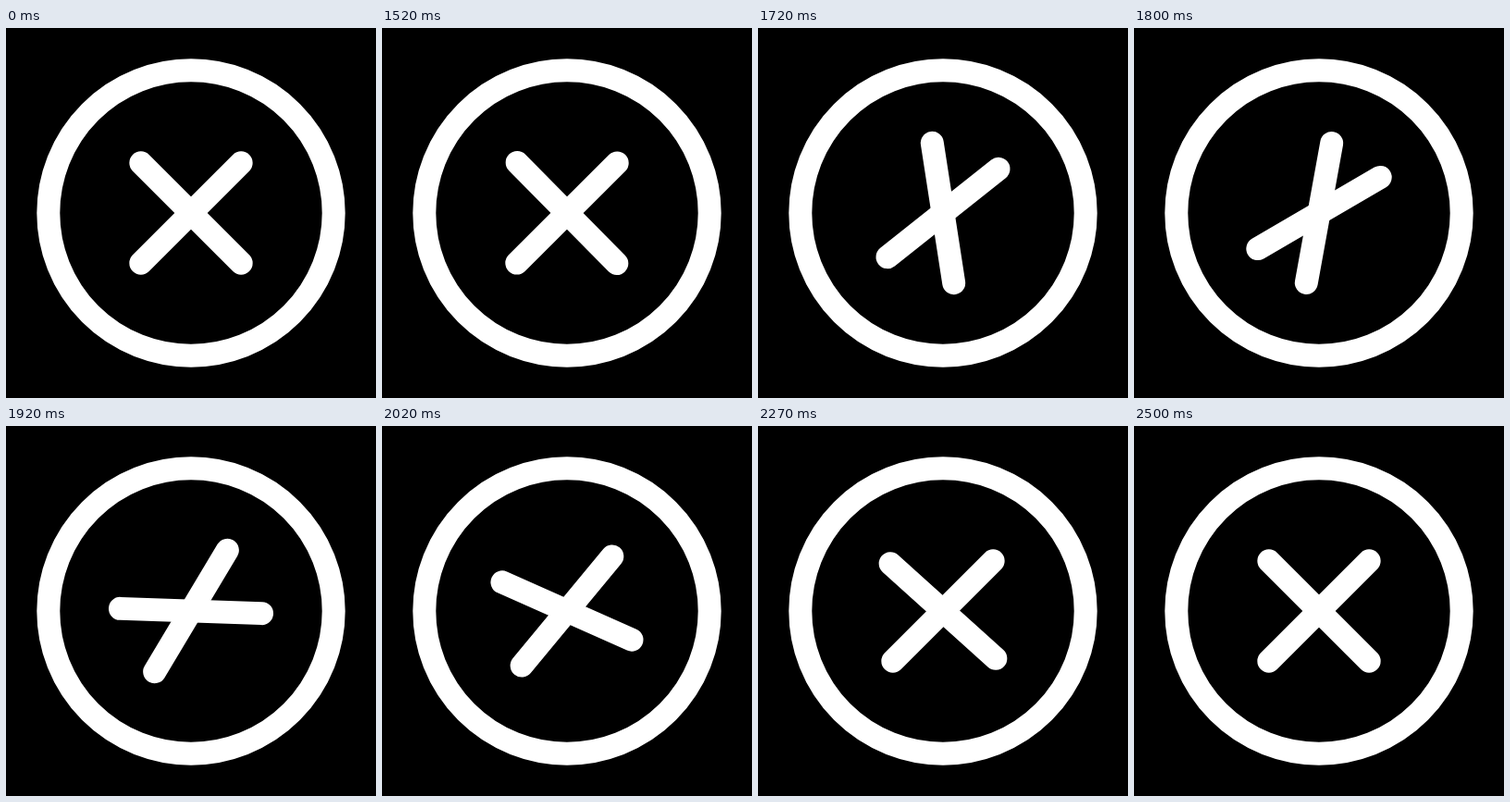
An HTML page for the animation above (2.52 s loop, 400 by 400 pixels).

```html
<!DOCTYPE html>
<html lang="en">
<head>
<meta charset="utf-8">
<title>Turning cross</title>
<style>
  html, body { margin: 0; width: 100%; height: 100%; overflow: hidden; background: #000; }
  svg { display: block; width: 100vw; height: 100vh; }
</style>
</head>
<body>
<svg viewBox="0 0 400 400" fill="none" stroke="#fff" stroke-width="25" stroke-linecap="round">
  <circle cx="200" cy="200" r="154.2"/>
  <path id="lead" d="M123.4 200H276.6"/>
  <path id="trail" d="M123.4 200H276.6"/>
</svg>
<script>
  const LOOP = 2520, START = 1495, STEP = 25;

  // Each bar makes a quarter turn; x1 and x2 shape its ease-in-out curve.
  const bars = [
    { el: document.getElementById('lead'), rest: 45, span: 720, x1: 0.33, x2: 0.29 },
    { el: document.getElementById('trail'), rest: 135, span: 1000, x1: 0.603, x2: 0.18 }
  ];

  // Cubic bezier from (0,0) to (1,1) with handles (x1,0) and (x2,1).
  function ease(x, x1, x2) {
    if (x <= 0) return 0;
    if (x >= 1) return 1;
    let lo = 0, hi = 1, s;
    for (let i = 0; i < 30; i++) {
      s = (lo + hi) / 2;
      const r = 1 - s;
      const at = 3 * s * r * r * x1 + 3 * s * s * r * x2 + s * s * s;
      if (at < x) lo = s; else hi = s;
    }
    return s * s * (3 - 2 * s);
  }

  // The motion advances in 25 ms steps, shown on a 10 ms clock.
  function elapsed(time) {
    const t = Math.floor((time % LOOP) / 10) * 10;
    return Math.max(0, Math.floor((t - START) / STEP)) * STEP;
  }

  function draw(time) {
    const u = elapsed(time);
    for (const { el, rest, span, x1, x2 } of bars) {
      const angle = rest + 90 * ease(u / span, x1, x2);
      el.setAttribute('transform', `rotate(${angle.toFixed(3)} 200 200)`);
    }
  }

  const begin = performance.now();
  function tick() {
    draw(performance.now() - begin);
    requestAnimationFrame(tick);
  }
  tick();
</script>
</body>
</html>
```
